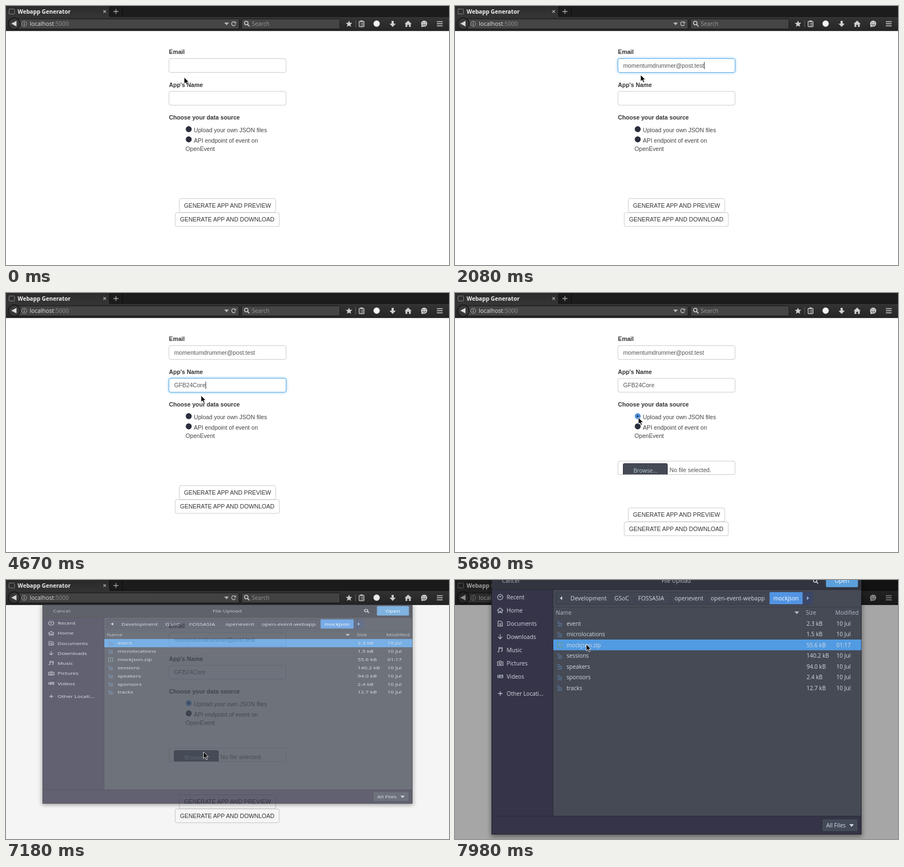
Animation of 802 by 470 pixels, one loop 8000 ms. Source, as an HTML page:

```html
<!DOCTYPE html>
<html lang="en">
<head>
<meta charset="utf-8">
<title>Webapp Generator</title>
<style>
  html, body { margin: 0; width: 100%; height: 100%; overflow: hidden; background: #fff; }
  svg { display: block; }
  text { white-space: pre; }
  .ui { font: 10.2px "Open Sans", "Noto Sans", sans-serif; }
  .page { font: 10.6px "Liberation Sans", Arial, sans-serif; }
  .label { font-weight: bold; font-size: 10.7px; fill: #333; }
  .glow { filter: drop-shadow(0 0 2.5px rgba(82, 178, 236, .75)); }
</style>
</head>
<body>
<svg id="stage" width="802" height="470" viewBox="0 0 802 470">
  <defs>
    <linearGradient id="bar" x2="0" y2="1"><stop stop-color="#343434"/><stop offset="1" stop-color="#262626"/></linearGradient>
    <linearGradient id="tab" x2="0" y2="1"><stop stop-color="#2b2b2b"/><stop offset="1" stop-color="#353535"/></linearGradient>
    <clipPath id="fileClip"><rect x="295" y="305" width="212" height="24.3"/></clipPath>
    <filter id="soft" x="-10%" y="-10%" width="120%" height="120%"><feGaussianBlur stdDeviation="4"/></filter>
  </defs>
</svg>
<script>
const LOOP = 8000;
const EMAIL = 'momentumdrummer@post.test';
const APP = 'GFB24Core';
const BLUE = '#5294e2';
const stage = document.getElementById('stage');

function add(parent, tag, attrs = {}, content) {
  const node = document.createElementNS('http://www.w3.org/2000/svg', tag);
  for (const key in attrs) node.setAttribute(key, attrs[key]);
  if (content) node.textContent = content;
  parent.appendChild(node);
  return node;
}
const group = (parent, attrs) => add(parent, 'g', attrs);
const rect = (parent, x, y, width, height, fill, more) => add(parent, 'rect', { x, y, width, height, fill, ...more });
const circle = (parent, cx, cy, r, fill, more) => add(parent, 'circle', { cx, cy, r, fill, ...more });
const text = (parent, x, y, content, fill, more) => add(parent, 'text', { x, y, fill, ...more }, content);
const fillPath = (parent, d, fill) => add(parent, 'path', { d, fill });
const linePath = (parent, d, stroke, width = 1) => add(parent, 'path', { d, stroke, fill: 'none', 'stroke-width': width });
const show = (node, on) => node.setAttribute('visibility', on ? 'visible' : 'hidden');

const clamp = v => Math.max(0, Math.min(1, v));
const ramp = (t, from, to) => clamp((t - from) / (to - from));

function drawChrome() {
  const g = group(stage, { class: 'ui' });
  rect(g, 0, 0, 802, 45, '#1c1c1c');
  rect(g, 0, 0, 188, 20, 'url(#tab)');
  rect(g, 0, 19, 802, 26, 'url(#bar)');
  rect(g, 188, 18.5, 614, 1, '#0c0c0c');
  rect(g, 0, 44, 802, 1.3, '#111');
  linePath(g, 'M187.5 1V19M210.5 1V19', '#0b0b0b');
  rect(g, 5.5, 5.5, 10, 9, 'none', { stroke: '#bbb', 'stroke-dasharray': '2 1.4', rx: 1 });
  text(g, 21, 13.7, 'Webapp Generator', '#f2f2f2', { 'font-weight': 700 });
  linePath(g, 'M176.3 7.7l4.6 4.6m0-4.6l-4.6 4.6', '#bbb', 1.2);
  linePath(g, 'M194.5 10h9M199 5.5v9', '#aaa', 1.3);

  rect(g, 15, 23.5, 407, 18, '#454545', { rx: 2, stroke: '#191919' });
  rect(g, 426.5, 23.5, 178, 18, '#454545', { rx: 2, stroke: '#191919' });
  circle(g, 15, 32, 10.5, '#383838', { stroke: '#151515', 'stroke-width': 1.4 });
  fillPath(g, 'M9.5 32L19 27V37Z', '#d8d8d8');
  circle(g, 33, 32.3, 4.5, 'none', { stroke: '#aaa' });
  linePath(g, 'M33 29.7v1.2M33 31.8v3', '#bbb', 1.2);
  const url = text(g, 43, 36, 'localhost', '#e2e2e2', { 'font-size': 10.5 });
  add(url, 'tspan', { fill: '#929292' }, ':5000');
  fillPath(g, 'M395 30h8.5l-4.2 5Z', '#b5b5b5');
  linePath(g, 'M415 30a3.6 3.6 0 1 0 .5 3.4', '#b5b5b5', 1.5);
  fillPath(g, 'M412.5 31.7h4v-4Z', '#b5b5b5');
  circle(g, 435, 31, 3.2, 'none', { stroke: '#ccc', 'stroke-width': 1.5 });
  linePath(g, 'M437.3 33.3l3.4 3.5', '#ccc', 1.8);
  text(g, 445, 36, 'Search', '#999');

  const ink = '#cfcfcf';
  fillPath(g, 'M621 26.5l1.7 3.9 4.2.3-3.2 2.8 1 4.2-3.7-2.3-3.7 2.3 1-4.2-3.2-2.8 4.2-.3Z', ink);
  linePath(g, 'M633 26v13', '#666');
  rect(g, 639.2, 28, 9, 9.5, 'none', { stroke: ink, 'stroke-width': 1.3, rx: 1 });
  linePath(g, 'M641 31h1m1 0h4M641 33h1m1 0h4M641 35.2h1m1 0h4', ink, .9);
  rect(g, 641.5, 26.3, 4.4, 2.5, ink);
  circle(g, 671, 32, 5.7, '#f4f4f4');
  fillPath(g, 'M698 27h4v5h3.6L700 38 694.4 32H698Z', ink);
  fillPath(g, 'M728 26.5l6.5 6H732.700V38H729.500V34h-3V38h-3.200V32.500H721.500Z', ink);
  circle(g, 757, 32, 5.6, ink);
  fillPath(g, 'M752 34l.2 4.500 4-1.500Z', ink);
  linePath(g, 'M754 33a3.300 3 0 0 0 6 0', '#333', 1.2);
  circle(g, 755, 30.5, .8, '#333');
  circle(g, 759, 30.5, .8, '#333');
  linePath(g, 'M780 28.500h10.500M780 32.200h10.500M780 36h10.500', ink, 1.5);
}

function drawField(parent, y, name) {
  text(parent, 295, y - 8.5, name, '#333', { class: 'label' });
  const box = { rx: 3 };
  rect(parent, 295, y, 212, 25, '#fff', { ...box, stroke: '#ccc' });
  const glow = rect(parent, 295, y, 212, 25, '#fff', { ...box, stroke: '#66afe9', class: 'glow' });
  const value = text(parent, 304.5, y + 16, '', '#555');
  const caret = rect(parent, 305, y + 6, 1, 13, '#333');
  return {
    set(content, focus, hasCaret) {
      if (value.textContent !== content) value.textContent = content;
      glow.setAttribute('opacity', focus);
      caret.setAttribute('x', 304.7 + (content ? value.getComputedTextLength() : 0));
      show(caret, hasCaret);
    }
  };
}

function drawButton(parent, x, y, width, content) {
  rect(parent, x, y, width, 25, '#fff', { rx: 3, stroke: '#ccc' });
  text(parent, x + width / 2, y + 16.3, content, '#333', { 'text-anchor': 'middle' });
}

function drawPopup(y, items) {
  const rowHeight = 12.7;
  const g = group(stage, { class: 'ui' });
  rect(g, 295, y, 212, items.length * rowHeight, '#404552', { stroke: '#2b2e39' });
  const mark = rect(g, 296, y + .5, 210, rowHeight, BLUE);
  items.forEach((item, i) => text(g, 303, y + 9.7 + i * rowHeight, item, '#d3dae3', { 'font-size': 9.8 }));
  return { set(open, marked) { show(g, open); show(mark, open && marked); } };
}

drawChrome();

const page = group(stage, { class: 'page' });
const emailField = drawField(page, 95.5, 'Email');
const appField = drawField(page, 155, "App's Name");
text(page, 295, 206, 'Choose your data source', '#333', { class: 'label' });
const radio = circle(page, 330.8, 223.5, 5.4, '#2b2e3b');
const radioDot = circle(page, 330.8, 223.5, 1.7, '#252b3c');
circle(page, 330.8, 242, 5.4, '#2b2e3b');
text(page, 340, 229.3, 'Upload your own JSON files', '#444');
text(page, 340, 248, 'API endpoint of event on', '#444');
text(page, 325, 263, 'OpenEvent', '#444');

const fileBox = group(page);
rect(fileBox, 295, 305, 212, 24.5, '#fff', { rx: 3, stroke: '#ccc' });
const clipped = group(fileBox, { 'clip-path': 'url(#fileClip)' });
const browse = rect(clipped, 304.5, 309.5, 80, 24, '#444955', { rx: 2, stroke: '#30343e' });
text(clipped, 323, 325.5, 'Browse…', '#b9cbd6', { class: 'ui' });
text(clipped, 388.5, 325.3, 'No file selected.', '#555');

const buttons = group(page);
drawButton(buttons, 313.8, 349.5, 174.5, 'GENERATE APP AND PREVIEW');
drawButton(buttons, 306.3, 375, 188.5, 'GENERATE APP AND DOWNLOAD');

const emailPopup = drawPopup(121, [EMAIL, 'moss@post.test', 'moonlight@post.test']);
const appPopup = drawPopup(180.5, [APP, 'GFB24Plan', 'GardenApp', 'Gallery']);

const dim = rect(stage, 0, 0, 802, 470, '#000');

function drawDialog() {
  const ink = '#d3dae3', dark = '#353448', body = '#454a55', edge = '#292b35';
  const g = group(stage, { class: 'ui' });
  rect(g, 65, -12, 672, 478, '#000', { filter: 'url(#soft)', opacity: .4 });
  rect(g, 66, -14, 670, 476, dark, { rx: 2 });
  rect(g, 66, -14, 670, 31, '#32353f');
  rect(g, 178, 17, 557.5, 412, body);
  linePath(g, 'M66 17.500H736M177.500 17V429M66 428.500H736', edge);
  rect(g, 66.5, -14, 669, 475.5, 'none', { stroke: '#23262e' });
  text(g, 85, 5, 'Cancel', '#a9b0bb');
  text(g, 400.5, 5, 'File Upload', '#b5bbc5', { 'text-anchor': 'middle' });
  circle(g, 652, 1, 3, 'none', { stroke: ink, 'stroke-width': 1.4 });
  linePath(g, 'M654 3l3.300 3.500', ink, 1.6);
  rect(g, 671.5, -10, 58, 23, '#5b9fdb', { rx: 2 });
  text(g, 700.5, 5, 'Open', '#fff', { 'text-anchor': 'middle' });

  const places = [
    ['Recent', 'M77 31a4.800 4.800 0 1 1 9.600 0a4.800 4.800 0 1 1-9.600 0M79.500 29l2.300 2 2-2'],
    ['Home', 'M76.500 55.500l5.300-5 5.300 5M78.300 54.500v5h2.500v-3h2v3h2.500v-5'],
    ['Documents', 'M78 74.500h5l2.700 2.700v6.500H78ZM80 79h4M80 81.200h4'],
    ['Downloads', 'M81.800 98.500v8M78 103l3.800 3.800 3.800-3.800'],
    ['Music', 'M79.500 130v-7.500h6v6.500M79.500 124.500h6M77 130.300h2.500M83 129.300h2.500'],
    ['Pictures', 'M77 148.500h2.500l1-1.500h3l1 1.500h2.300v6.500H77ZM80 151.600a1.900 1.900 0 1 0 3.800 0a1.900 1.900 0 1 0-3.800 0'],
    ['Videos', 'M77.500 172v6M79 175h5M80 172.500h6.500v5H80ZM81 174.500h5'],
  ];
  places.forEach(([name, icon], i) => {
    linePath(g, icon, '#b9c0ca', 1.2);
    text(g, 93.5, 34.7 + i * 24, name, ink);
  });
  linePath(g, 'M78 206h8M82 202v8', '#b9c0ca', 1.3);
  text(g, 93.5, 209.500, 'Other Locati…', ink);

  rect(g, 182.5, 22, 465, 22, '#414653', { rx: 2, stroke: '#343843' });
  fillPath(g, 'M194 29.500v7l-4-3.500Z', ink);
  [[209, 'Development'], [288.5, 'GSoC'], [331.5, 'FOSSASIA'], [397.5, 'openevent'], [463, 'open-event-webapp']]
    .forEach(([x, name]) => text(g, x, 36.8, name, ink, { 'font-size': 10.5 }));
  linePath(g, 'M201.500 22v22M281.500 22v22M324.500 22v22M390.500 22v22M456.500 22v22', '#3b404b');
  rect(g, 569.5, 22, 60, 22, BLUE);
  text(g, 599.3, 36.8, 'mockjson', '#fff', { 'text-anchor': 'middle' });
  rect(g, 629.5, 22, 18.5, 22, '#3b4768');
  fillPath(g, 'M637 29.500v7l4-3.500Z', '#8fa9d0');

  linePath(g, 'M178 49.500H736', '#3a3e49');
  [[182.5, 'Name'], [635, 'Size'], [688.5, 'Modified']].forEach(([x, name]) => text(g, x, 62.8, name, '#b2b8c3'));
  fillPath(g, 'M614.500 57h8.500l-4.200 5Z', '#b2b8c3');

  const files = [['event', '2.3 kB'], ['microlocations', '1.5 kB'], ['mockjson.zip', '55.6 kB', '01:17'],
    ['sessions', '140.2 kB'], ['speakers', '94.0 kB'], ['sponsors', '2.4 kB'], ['tracks', '12.7 kB']];
  const mark = rect(g, 178, 69, 557.5, 19.5, '#529be2');
  files.forEach(([name, size, date = '10 Jul'], i) => {
    const y = 79 + i * 19.5;
    if (name.endsWith('.zip')) {
      rect(g, 185.5, y - 4.5, 8, 9, 'none', { stroke: '#6f9a89' });
      linePath(g, `M189.500 ${y - 3}v5`, '#8bb39c');
    } else {
      linePath(g, `M185 ${y - 3.5}h5M185 ${y - .5}h9M187 ${y + 2}h7M185 ${y + 4.5}h9`, '#5f7ea8');
    }
    text(g, 202, y + 3.6, name, ink);
    text(g, 636.5, y + 3.6, size, ink);
    text(g, 690.5, y + 3.6, date, ink);
  });
  rect(g, 664.5, 433.5, 65, 23, '#444a58', { rx: 2, stroke: '#2c2f3a' });
  text(g, 672, 449, 'All Files', ink);
  fillPath(g, 'M714 443h8l-4 5Z', ink);
  return {
    set(open, row) {
      show(g, open > 0);
      g.setAttribute('opacity', open);
      g.setAttribute('transform', `translate(0 ${228 * (1 - open)}) scale(1 ${open})`);
      mark.setAttribute('y', 69 + row * 19.5);
    }
  };
}
const dialog = drawDialog();

const pointer = group(stage);
const arrow = add(pointer, 'path', {
  d: 'M0 0V12L2.800 9.400 4.900 14 7 13.100 5 8.700H8.700Z', fill: '#0b0b0b', stroke: '#fff', 'stroke-width': .8
});
const beam = linePath(pointer, 'M-2.500-6.500H2.500M0-6.500V6.500M-2.500 6.500H2.500', '#222');

// time, x, y of the pointer's hot spot
const pointerTrack = [
  [0, 322.5, 129.5], [40, 321, 124], [130, 313, 103], [180, 310, 97], [250, 309, 108],
  [1600, 318, 114], [1620, 319, 115.5], [1940, 336, 125], [2090, 336, 125], [2320, 340, 145],
  [2560, 342, 170], [4150, 344, 174], [4170, 344, 175], [4500, 353, 186], [4680, 353, 186],
  [5070, 332, 226], [6000, 332, 226], [6250, 345, 262], [6500, 360.5, 304], [6730, 357.5, 312],
  [7360, 357.5, 312], [7560, 318, 232], [7780, 258, 139], [7930, 237.5, 116.5], [LOOP, 237.5, 116.5]
];

function pointerAt(t) {
  const i = Math.max(1, pointerTrack.findIndex(key => key[0] > t));
  const a = pointerTrack[i - 1], b = pointerTrack[i], p = ramp(t, a[0], b[0]);
  return [a[1] + (b[1] - a[1]) * p, a[2] + (b[2] - a[2]) * p];
}

const typed = (t, word, start, done, letters) =>
  t < start ? '' : t >= done ? word : word.slice(0, Math.min(letters, 1 + Math.floor((t - start) / 90)));

function draw(t) {
  const fade = (from, to) => ramp(t, from, from + 170) * (1 - ramp(t, to, to + 170));
  emailField.set(typed(t, EMAIL, 1280, 2080, 2), fade(530, 2560), t >= 530 && t < 2560);
  appField.set(typed(t, APP, 3350, 4670, 2), fade(2560, 5480), t >= 2560 && t < 5480);
  emailPopup.set(t >= 1430 && t < 2080, t >= 1780);
  appPopup.set(t >= 3520 && t < 4670, t >= 4340);

  const uploading = t >= 5600;
  radio.setAttribute('fill', uploading ? BLUE : '#2b2e3b');
  show(radioDot, uploading);
  show(fileBox, uploading);
  buttons.setAttribute('transform', `translate(0 ${uploading ? 40.5 : 0})`);
  browse.setAttribute('fill', t >= 6620 ? '#4c5261' : '#444955');

  const p = ramp(t, 7130, 7230);
  dialog.set(p * (2 - p), t >= 7980 ? 2 : 0);
  dim.setAttribute('opacity', .35 * ramp(t, 7130, 7570));

  const [x, y] = pointerAt(t);
  const inEmail = y > 95 && y < 115 && t < 1600;
  const inApp = y > 155 && y < 175 && t > 2300 && t < 4160;
  const typing = (t >= 1280 && t < 1610) || (t >= 3350 && t < 4160);
  pointer.setAttribute('transform', `translate(${x} ${y})`);
  show(arrow, !typing && !inEmail && !inApp);
  show(beam, !typing && (inEmail || inApp));
}

function tick() {
  draw(performance.now() % LOOP);
  requestAnimationFrame(tick);
}
tick();
</script>
</body>
</html>
```
